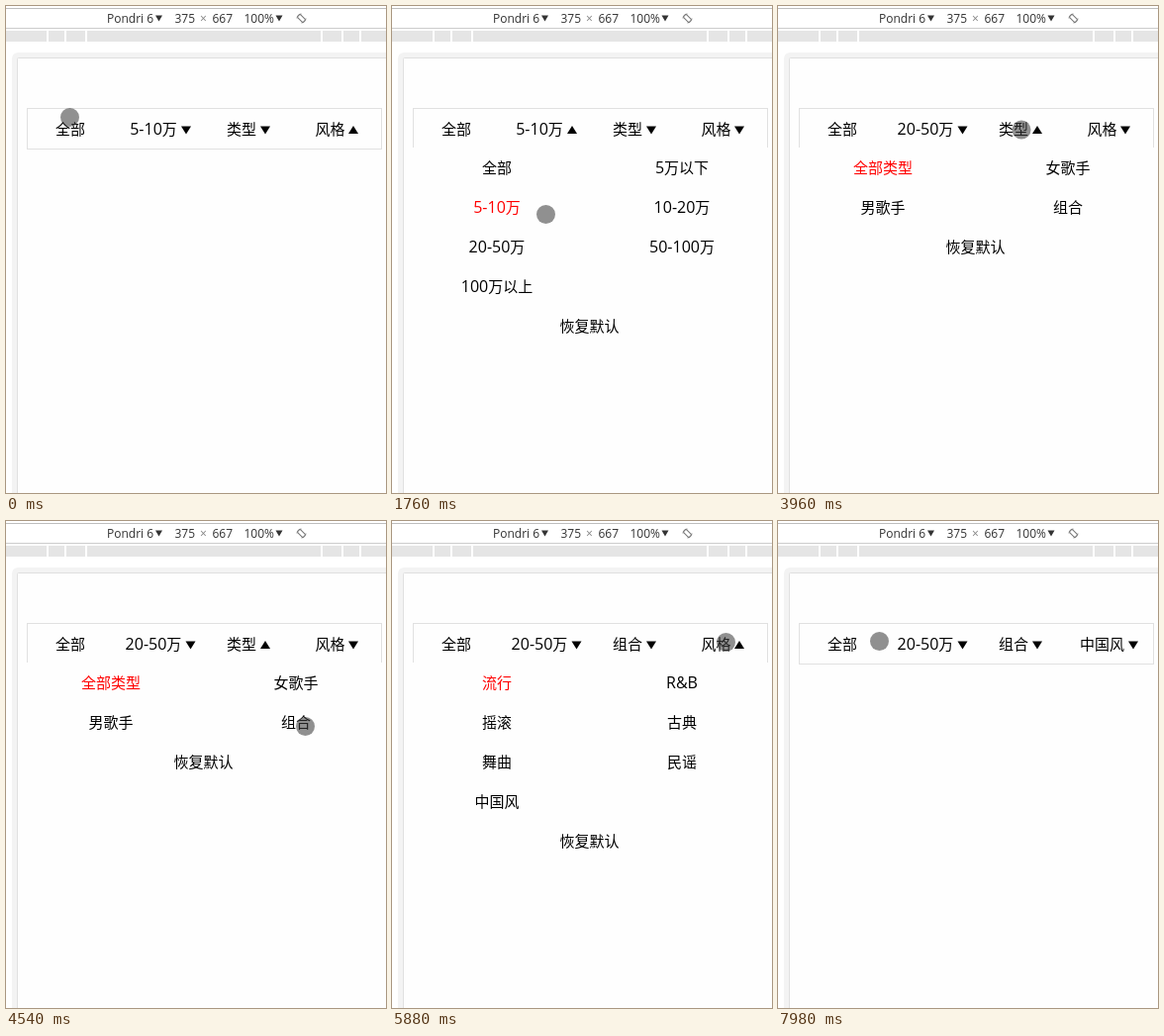
Recreate the animation shown at these times as an HTML page. Size 384x492 px, loop 8 s.

```html
<!DOCTYPE html>
<html lang="zh-CN">
<head>
<meta charset="utf-8">
<title>筛选菜单</title>
<style>
  html, body { margin: 0; width: 100%; height: 100%; overflow: hidden; background: #fff; }
  svg { display: block; width: 384px; height: 492px; }
  text { font: 15px "Noto Sans CJK SC", "Noto Sans CJK JP", "Noto Sans CJK", sans-serif; fill: #000; text-anchor: middle; }
  .latin { font-family: "Open Sans", "Noto Sans", sans-serif; font-size: 16px; }
  .bar text { font: 12px "Open Sans", "Noto Sans", sans-serif; fill: #333; text-anchor: start; }
  .chosen { fill: #f00; }
</style>
</head>
<body>
<svg id="stage" viewBox="0 0 384 492">
  <rect width="384" height="492" fill="#fff"/>
  <g class="bar">
    <path d="M0 2.5H384" stroke="#bdbdbd"/>
    <path d="M0 22.5H384" stroke="#ccc"/>
    <text x="102" y="17">Pondri 6</text>
    <path d="M151 9.5h7l-3.5 6z M272.500 9.5h7l-3.5 6z" fill="#333"/>
    <text x="170.500" y="17">375</text>
    <text x="196" y="17" style="fill:#888">×</text>
    <text x="208.500" y="17">667</text>
    <text x="240.500" y="17">100%</text>
    <g fill="none" stroke="#777" transform="translate(298.500 12.500)">
      <rect x="-2" y="-4" width="4" height="8" rx="1" transform="rotate(-45)"/>
      <path d="M-4.500 0A4.500 4.500 0 0 1 0 -4.500M4.500 0A4.500 4.500 0 0 1 0 4.500" stroke-width=".8"/>
    </g>
  </g>
  <rect y="25" width="384" height="11" fill="#e5e5e5"/>
  <path d="M42 25v11M60 25v11M81 25v11M319 25v11M340 25v11M358 25v11" stroke="#fff" stroke-width="2"/>
  <rect x="6" y="47" width="400" height="470" rx="6" fill="#f3f3f3"/>
  <rect x="11.500" y="52.500" width="400" height="470" rx="1" fill="#fefefe" stroke="#e0e0e0"/>
  <rect x="21.500" y="103.500" width="358" height="41" fill="#fefefe" stroke="#e1e1e1"/>
  <g id="tabs"></g>
  <g id="panels"></g>
  <circle id="touch" r="9.500" fill="#3c3c3c" fill-opacity=".57"/>
</svg>
<script>
const LOOP = 8000;
const NS = 'http://www.w3.org/2000/svg';
const $ = id => document.getElementById(id);

function add(parent, tag, attrs = {}) {
  const el = document.createElementNS(NS, tag);
  for (const k in attrs) el.setAttribute(k, attrs[k]);
  return parent.appendChild(el);
}

// Latin runs and Chinese runs use different fonts.
function fill(el, str) {
  el.textContent = '';
  for (const run of str.match(/[ -~]+|[^ -~]+/g)) {
    add(el, 'tspan', /[ -~]/.test(run) ? { class: 'latin' } : {}).textContent = run;
  }
}

function label(parent, str, x, y) {
  const el = add(parent, 'text', { x, y });
  fill(el, str);
  return el;
}

const menus = [
  { x: 149, chosen: 2, options: ['全部', '5万以下', '5-10万', '10-20万', '20-50万', '50-100万', '100万以上'] },
  { x: 238, chosen: 0, options: ['全部类型', '女歌手', '男歌手', '组合'] },
  { x: 327.5, chosen: 0, options: ['流行', 'R&B', '摇滚', '古典', '舞曲', '民谣', '中国风'] }
];

label($('tabs'), '全部', 65, 130);
for (const m of menus) {
  m.title = add($('tabs'), 'text', { x: m.x, y: 130 });
  m.arrow = add($('tabs'), 'path');
  m.panel = add($('panels'), 'g');
  const rows = Math.ceil(m.options.length / 2);
  add(m.panel, 'rect', { x: 21, y: 143, width: 359, height: rows * 40 + 40, fill: '#fefefe' });
  m.options.forEach((str, i) => {
    const el = label(m.panel, str, i % 2 ? 293 : 106, 169 + 40 * (i >> 1));
    if (i === m.chosen) el.setAttribute('class', 'chosen');
  });
  label(m.panel, '恢复默认', 199.5, 169 + 40 * rows);
}

// Menu states: start, open panel, raised arrow, titles with arrow offsets
const price = ['5-10万', 33], newPrice = ['20-50万', 37.5];
const kind = ['类型', 24], group = ['组合', 24];
const style = ['风格', 23.5], folk = ['中国风', 31.5];
const states = [
  [0, -1, 2, price, kind, style],
  [1250, 0, 0, price, kind, style],
  [2610, -1, -1, newPrice, kind, style],
  [3960, 1, 1, newPrice, kind, style],
  [4940, -1, -1, newPrice, group, style],
  [5880, 2, 2, newPrice, group, style],
  [7050, -1, -1, newPrice, group, folk]
];

// Touch strokes: first and last step time, then one point per step
const strokes = [
  [0, 0, '64.5,112.5'],
  [130, 1100, '59,109 49,109 43,117 47,131 68,141 102,141 136,136 153,132'],
  [1250, 2150, '154,132 155,140 156,160 156,186 155.5,210.5 143,232 124,247 113,249'],
  [2300, 2300, '115,245'],
  [2610, 3240, '114.5,233.5 135,205 170,165 210,135 235,127 246,125'],
  [3960, 4540, '246,125 262,140 280,165 294,190 302.5,207.5'],
  [4940, 5610, '303,204 308,185 318,160 328,138 335,126 337.5,122.5'],
  [5880, 6740, '337.5,122.5 325,140 285,180 230,225 170,258 130,276 116.5,281.5'],
  [7050, 7980, '116.5,278 116,262 115,235 112,205 108,175 105,150 103,130 102.5,121.5']
];

const steps = strokes.flatMap(([from, to, points]) => {
  const list = points.split(' ');
  const gap = (to - from) / Math.max(1, list.length - 1);
  return list.map((p, i) => [Math.floor((from + gap * i + 0.01) / 10) * 10, ...p.split(',')]);
});

const at = (table, t) => table.findLast(row => row[0] <= t);
let shown = null;

function showState(state) {
  const [, open, raised, ...titles] = state;
  menus.forEach((m, i) => {
    const [str, offset] = titles[i];
    fill(m.title, str);
    m.arrow.setAttribute('d', `M${m.x + offset - 5} ` + (i === raised ? '129h10l-5 -8z' : '121.5h10l-5 8z'));
    m.panel.setAttribute('visibility', i === open ? 'visible' : 'hidden');
  });
  shown = state;
}

function draw() {
  const t = performance.now() % LOOP;
  const state = at(states, t);
  if (state !== shown) showState(state);
  const [, x, y] = at(steps, t);
  $('touch').setAttribute('cx', x);
  $('touch').setAttribute('cy', y);
  requestAnimationFrame(draw);
}
draw();
</script>
</body>
</html>
```
